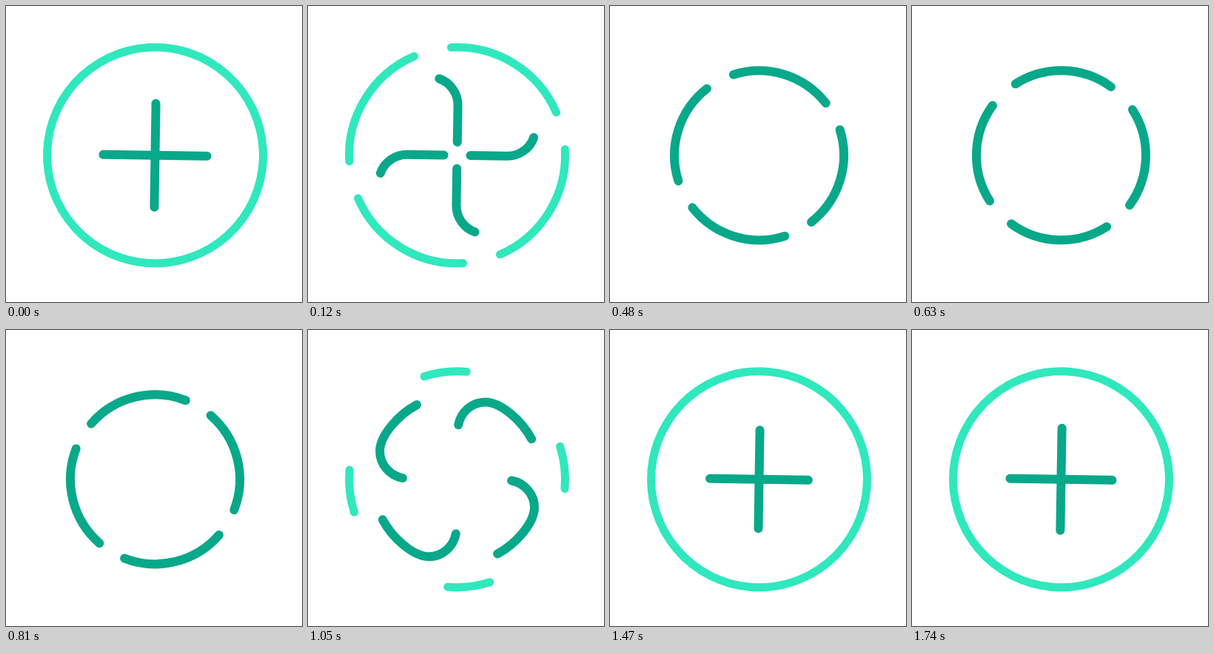
These frames come from a looping animation (400x400 px, 3360 ms). An HTML page:

```html
<!DOCTYPE html>
<html lang="en">
<head>
<meta charset="utf-8">
<title>Plus spin</title>
<style>
  html, body { margin: 0; width: 100%; height: 100%; overflow: hidden; background: #fff; }
  svg { display: block; width: 100vw; height: 100vh; }
  path { fill: none; stroke-linecap: round; }
  .ring { stroke: #30e8bd; stroke-width: 11; }
  .arm { stroke: #08a88a; stroke-width: 12; }
</style>
</head>
<body>
<svg viewBox="0 0 400 400"><g id="stage" transform="translate(201.5 201.8)"></g></svg>
<script>
const LOOP = 3360, STEP = 30, TURN = 645, TILT = 0.9;
const RING_LENGTH = 229.5;
const RING = 'M-10.4-145.6A146 146 0 0 1 145.6-10.4';
// From the centre up an arm, round a bend and onto the inner circle.
const ARM = 'M0 0V-67C0-88-16.6-105-37-105C-49-105-61.8-97.3-71.9-89.1' +
  'A114.5 114.5 0 0 0-73.6 87.7';

const stage = document.getElementById('stage');
const addPath = (parent, className, d) => {
  const path = document.createElementNS(stage.namespaceURI, 'path');
  path.setAttribute('class', className);
  path.setAttribute('d', d);
  return parent.appendChild(path);
};
const quarters = [0, 90, 180, 270].map(angle => {
  const group = stage.appendChild(document.createElementNS(stage.namespaceURI, 'g'));
  return { angle, group, ring: addPath(group, 'ring', RING), arm: addPath(group, 'arm', ARM) };
});

const progress = (t, start, end) => Math.min(1, Math.max(0, (t - start) / (end - start)));
const smooth = x => x * x * (3 - 2 * x);
const ease = (t, start, end) => smooth(progress(t, start, end));
const mix = (a, b, x) => a + (b - a) * x;

function trim(path, from, to) {
  path.style.visibility = to - from > 0.1 ? 'visible' : 'hidden';
  path.setAttribute('stroke-dasharray', `${Math.max(0, to - from)} 2000`);
  path.setAttribute('stroke-dashoffset', -from);
}

// The way out and the mirrored way back share the same paths.
function pose(t) {
  if (t < TURN) return {
    mirror: 1,
    inner: mix(0, 197, ease(t, 0, TURN)),
    outer: mix(70, 334, smooth(progress(t, 0, TURN) ** 0.8)),
    ring: 1 - ease(t, 0, 390)
  };
  return {
    mirror: -1,
    inner: mix(197, 0, ease(t, 637, 1343)),
    outer: mix(334, 66, ease(t, TURN, 1490)) + 3 * ease(t, 1490, 1755),
    ring: ease(t, 850, 1460)
  };
}

function draw(now) {
  const t = Math.floor(now % LOOP / STEP) * STEP;
  const { mirror, inner, outer, ring } = pose(t);
  for (const quarter of quarters) {
    quarter.group.setAttribute('transform', `rotate(${quarter.angle + TILT}) scale(${mirror} 1)`);
    trim(quarter.ring, 0, RING_LENGTH * ring);
    trim(quarter.arm, inner, outer);
  }
}

const began = performance.now();
function tick() {
  draw(performance.now() - began);
  requestAnimationFrame(tick);
}
tick();
</script>
</body>
</html>
```
